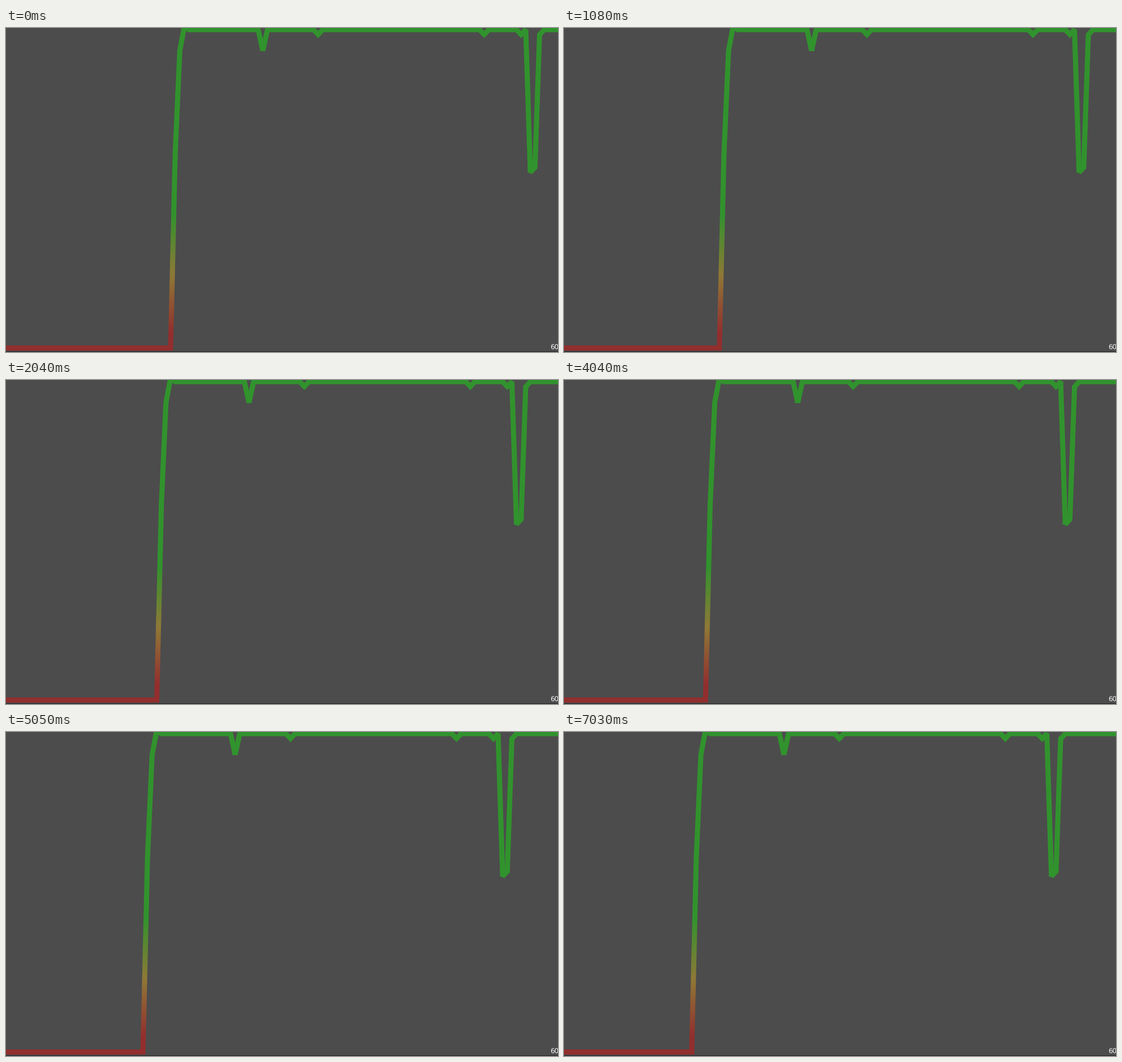
Write a matplotlib script that moves like this. It is 976 px wide and 574 px high and loops after 8 s.

```python
import numpy as np
import matplotlib.pyplot as plt
from matplotlib.animation import FuncAnimation
from matplotlib.collections import PolyCollection
from matplotlib.colors import to_rgb
from matplotlib.patches import Rectangle
from matplotlib.transforms import Affine2D

W, H, DPI = 976, 574, 100
LOOP, INTERVAL = 8000, 20
BG, GREEN, AMBER, RED = "#4c4c4c", "#31932d", "#8f7836", "#922e2e"
GREEN_Y, AMBER_Y, RED_Y = 330, 438, 540
STEP, RISE_X, WIDTH = 8.155, 291.0, 9
TOP, FLOOR = 3, 567
TICKS = [70, 1080, 2040, 3050, 4040, 5050, 6020, 7030]

plt.rcParams["path.simplify"] = False
fig = plt.figure(figsize=(W / DPI, H / DPI), dpi=DPI, facecolor=BG)
ax = fig.add_axes([0, 0, 1, 1])
ax.set(xlim=(0, W), ylim=(H, 0))
ax.axis("off")

# One reading per second, as pixel heights counted from the start of the rise.
y = np.full(101, float(TOP))
y[:4] = FLOOR, 222, 40, -3
y[20] = 40
y[[32, 68, 76]] = 11.5
y[78:81] = 255.5, 247, 12
x = RISE_X + STEP * np.arange(len(y))
curve = np.vstack([[-20, FLOOR], np.column_stack([x, y])])
SHARP = [21, 78, 79]  # corners too acute for a miter

scroll = Affine2D()
moving = scroll + ax.transData


def toward(a, b, dist):
    return a + (b - a) * dist / np.hypot(*(b - a))


def stroke(points, color, join, y0, y1):
    line, = ax.plot(*points.T, color=color, lw=WIDTH * 72 / DPI,
                    solid_joinstyle=join, solid_capstyle="butt",
                    transform=moving, snap=False)
    line.set_clip_path(Rectangle((0, y0), W, y1 - y0, transform=ax.transData))


cuts = [0, *SHARP, len(curve) - 1]
for a, b in zip(cuts, cuts[1:]):
    stroke(curve[a:b + 1], GREEN, "miter", 0, GREEN_Y)
for i in SHARP:
    p, q, r = curve[i - 1:i + 2]
    stroke(np.array([toward(q, p, 3), q, toward(q, r, 3)]),
           GREEN, "bevel", 0, GREEN_Y)
stroke(curve[:3], RED, "miter", RED_Y, H)

# Colour blend along the steep rise, one strip per pixel row.
rows = np.arange(GREEN_Y, RED_Y)


def rise(v):
    return RISE_X + STEP * (FLOOR - v) / (FLOOR - y[1])


half = WIDTH / 2
strips = [[(rise(v) - half, v), (rise(v) + half, v),
           (rise(v + 1) + half, v + 1), (rise(v + 1) - half, v + 1)]
          for v in rows]
stops = np.array([to_rgb(c) for c in (GREEN, AMBER, RED)])
blend = np.column_stack([np.interp(rows + 0.5, [GREEN_Y, AMBER_Y, RED_Y], ch)
                         for ch in stops.T])
ax.add_collection(PolyCollection(strips, facecolors=blend, linewidths=0,
                                 transform=moving, snap=False),
                  autolim=False)

ax.add_patch(Rectangle((0, H - 1), W, 1, color="#222222", lw=0))
ax.text(961.9, 569, "60", color="#f2f2f2", family="DejaVu Sans",
        size=12 * 72 / DPI, va="baseline", clip_on=True)


def update(n):
    now = n * INTERVAL + INTERVAL / 2
    scroll.clear().translate(-STEP * sum(now >= t for t in TICKS), 0)
    return []


anim = FuncAnimation(fig, update, frames=LOOP // INTERVAL, interval=INTERVAL,
                     repeat=True, repeat_delay=0, blit=False)
plt.show()
```
